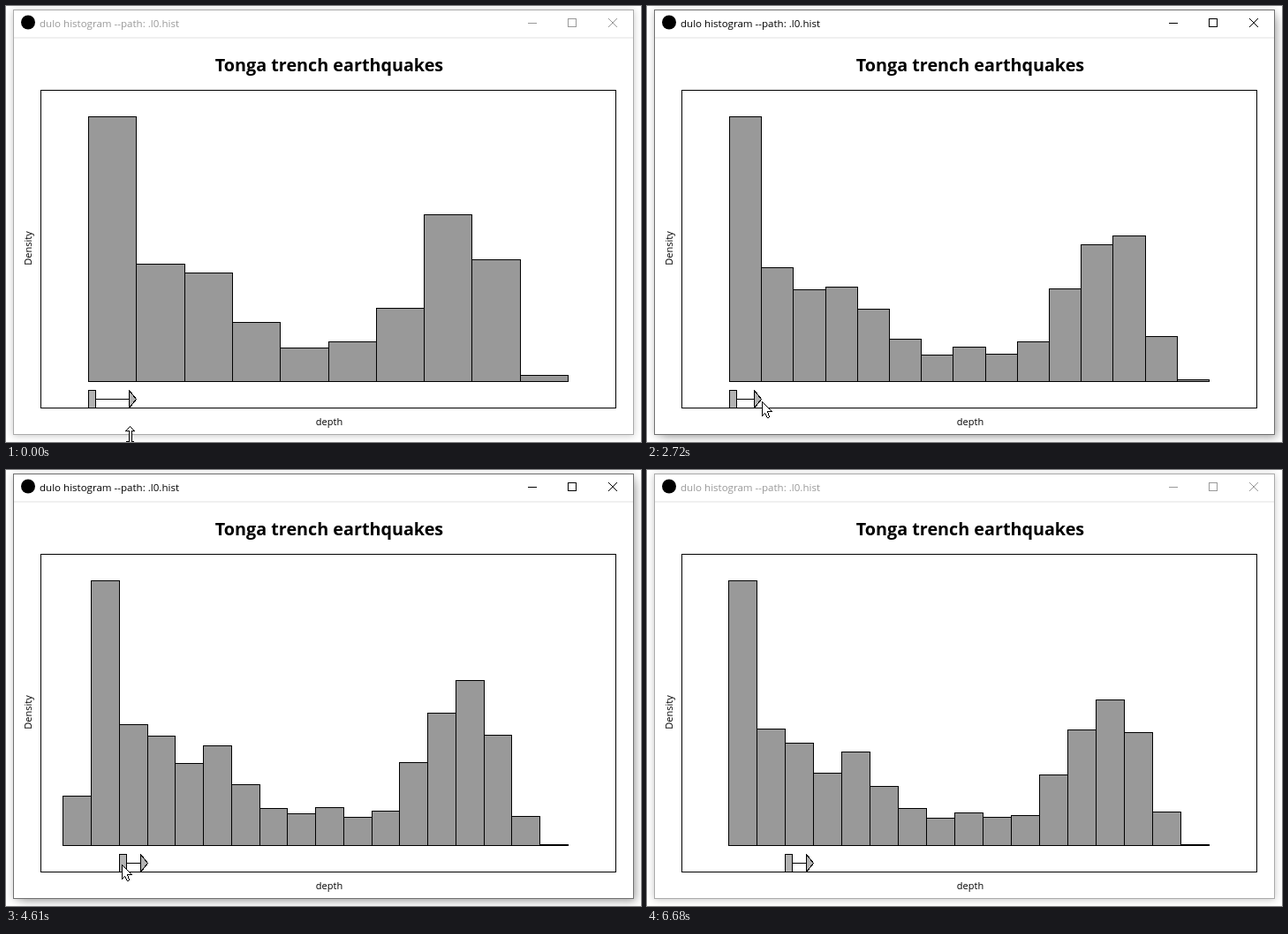
An HTML page for the animation above (6.78 s loop, 719 by 494 pixels).

```html
<!DOCTYPE html>
<html lang="en">
<head>
<meta charset="utf-8">
<title>Histogram bin handles</title>
<style>
html, body { margin: 0; width: 100%; height: 100%; overflow: hidden; background: #fff; }
#win { position: absolute; left: 8px; top: 4px; width: 701px; height: 480px; border: 1px solid #707070;
  background: #fff; box-shadow: 0 1px 8px rgba(0,0,0,.22), 6px 6px 10px -3px rgba(0,0,0,.22); }
#win.idle { border-color: #aaa; box-shadow: 0 1px 8px rgba(0,0,0,.22); }
svg { position: absolute; left: 0; top: 0; }
text { font-family: "Open Sans", "Noto Sans", sans-serif; }
.crisp { shape-rendering: crispEdges; }
#chrome { color: #000; }
#chrome.idle { color: #999; }
</style>
</head>
<body>
<div id="win"></div>
<svg width="719" height="494" viewBox="0 0 719 494">
  <rect class="crisp" x="9" y="35" width="701" height="2" fill="#f0f0f0"/>
  <circle cx="25" cy="18.5" r="8"/>
  <g id="chrome">
    <text x="38" y="24" font-size="11.55" fill="currentColor">dulo histogram --path: .l0.hist</text>
    <g transform="translate(.5 .5)" fill="none" stroke="currentColor">
      <path class="crisp" d="M590.5 19H600.5M636 14H645V23H636Z"/>
      <path d="M681.5 13.5L691.5 23.5M691.5 13.5L681.5 23.5"/>
    </g>
  </g>
  <text x="366" y="74" font-size="19.75" font-weight="700" text-anchor="middle">Tonga trench earthquakes</text>
  <text x="366" y="475" font-size="11" text-anchor="middle">depth</text>
  <text transform="translate(29 274.5) rotate(-90)" font-size="11" text-anchor="middle">Density</text>
  <g class="crisp" transform="translate(.5 .5)" stroke="#000">
    <path d="M39 95H690V455H39Z" fill="none"/>
    <path id="bars" fill="#999"/>
    <path id="handles" fill="#b3b3b3"/>
  </g>
  <path id="cursor" class="crisp" fill="#fff" stroke="#000"/>
</svg>
<script>
const LOOP = 6780, LEFT = 93, RIGHT = 636, BASE = 425, TALL = 300;
const ARROW = 'M.5 .5V16.5L3.8 13.2L6.2 18.5H7.7L8.5 17L6.5 11.5H11.5Z';
const RESIZE = 'M0 .5L4.5 5H1.5V17H4.5L0 21.5L-4.5 17H-1.5V5H-4.5Z';

// the data: events per 20 km of depth, plus a few exactly at the minimum
const MIN = 40, MAX = 680, SLICE = 20, AT_MIN = 12;
const counts = [110,82,49,35,43,34,25,29,43,27,27,15,19,7,10,12,
  8,18,9,10,9,15,27,31,46,46,56,58,49,22,15,2];

function eventsAbove(x) {
  if (x <= MIN) return 0;
  const at = (x - MIN) / SLICE;
  return counts.reduce((sum, c, i) => sum + c * Math.min(1, Math.max(0, at - i)), AT_MIN);
}

// spans of mouse activity; the picture holds still in between
const spans = [[0, 0], [150, 1350], [1940, 2990], [3550, 3850], [4100, 5360], [5790, 5790]];

// keyed values, linear in between
const binWidth = [[930, 68.2], [1080, 61], [1200, 84], [1350, 92], [1940, 88.4], [2180, 82],
  [2450, 68], [2720, 44.7], [2990, 39.55]];
const origin = [[3850, MIN], [4100, 47.25], [4610, 83.4], [5090, 110.5], [5360, 117.9]];
const freeX = [[150, 132], [390, 141], [1080, 141], [3550, 100], [3850, 97], [5790, 367]];
const tipY = [[150, 472], [390, 451], [660, 446], [1940, 445], [2990, 449], [3550, 453],
  [3850, 448], [5360, 446], [5790, 473]];
const grip = [[4100, 5], [5360, 0]];

function at(keys, t) {
  const i = keys.findIndex(k => k[0] >= t);
  if (i < 1) return keys.at(i)[1];
  const [t0, v0] = keys[i - 1], [t1, v1] = keys[i];
  return v0 + (v1 - v0) * (t - t0) / (t1 - t0);
}

// the picture refreshes about 7.5 times a second, on a 30 ms grid
function tick(t) {
  const [start, end] = spans.findLast(s => s[0] <= t);
  if (t >= end) return end;
  let now = start;
  for (let k = 1, next; (next = start + Math.floor(k * 133.34 / 30) * 30) <= t; k++) now = next;
  return now;
}

const $ = id => document.getElementById(id);

function draw(t) {
  const w = at(binWidth, t), o = at(origin, t);
  const before = Math.ceil((o - MIN) / w), after = Math.ceil((MAX - o) / w);
  const scale = (RIGHT - LEFT) / (o + after * w - MIN);
  const edges = Array.from({ length: before + after + 1 }, (_, i) => o + (i - before) * w);
  const px = x => Math.round(LEFT + (x - MIN) * scale);

  const bins = edges.slice(1).map((x, i) => eventsAbove(x) - eventsAbove(edges[i]));
  const top = Math.max(...bins);
  $('bars').setAttribute('d', bins.map((n, i) => {
    const y = BASE - Math.max(1, Math.round(TALL * n / top));
    return `M${px(edges[i])} ${BASE}V${y}H${px(edges[i + 1])}V${BASE}Z`;
  }).join(''));

  const a = px(o), b = px(o + w);
  $('handles').setAttribute('d',
    `M${a} 435H${a + 8}V455H${a}ZM${a + 8} 445H${b - 8}M${b - 8} 435L${b} 445L${b - 8} 455Z`);

  let x = at(freeX, t), y = at(tipY, t), shape = ARROW;
  if (t < 150) [x, y, shape] = [140.5, 476, RESIZE];
  else if (t >= 1080 && t < 3550) x = b + 1;
  else if (t >= 4100 && t < 5790) x = a + at(grip, t);
  $('cursor').setAttribute('d', shape);
  $('cursor').setAttribute('transform', `translate(${t < 150 ? x : Math.round(x)} ${Math.round(y)})`);
}

function frame() {
  const t = performance.now() % LOOP;
  draw(tick(t));
  $('cursor').style.display = t < 5940 ? '' : 'none';
  for (const id of ['win', 'chrome']) $(id).classList.toggle('idle', t < 810 || t >= 6680);
  requestAnimationFrame(frame);
}
frame();
</script>
</body>
</html>
```
